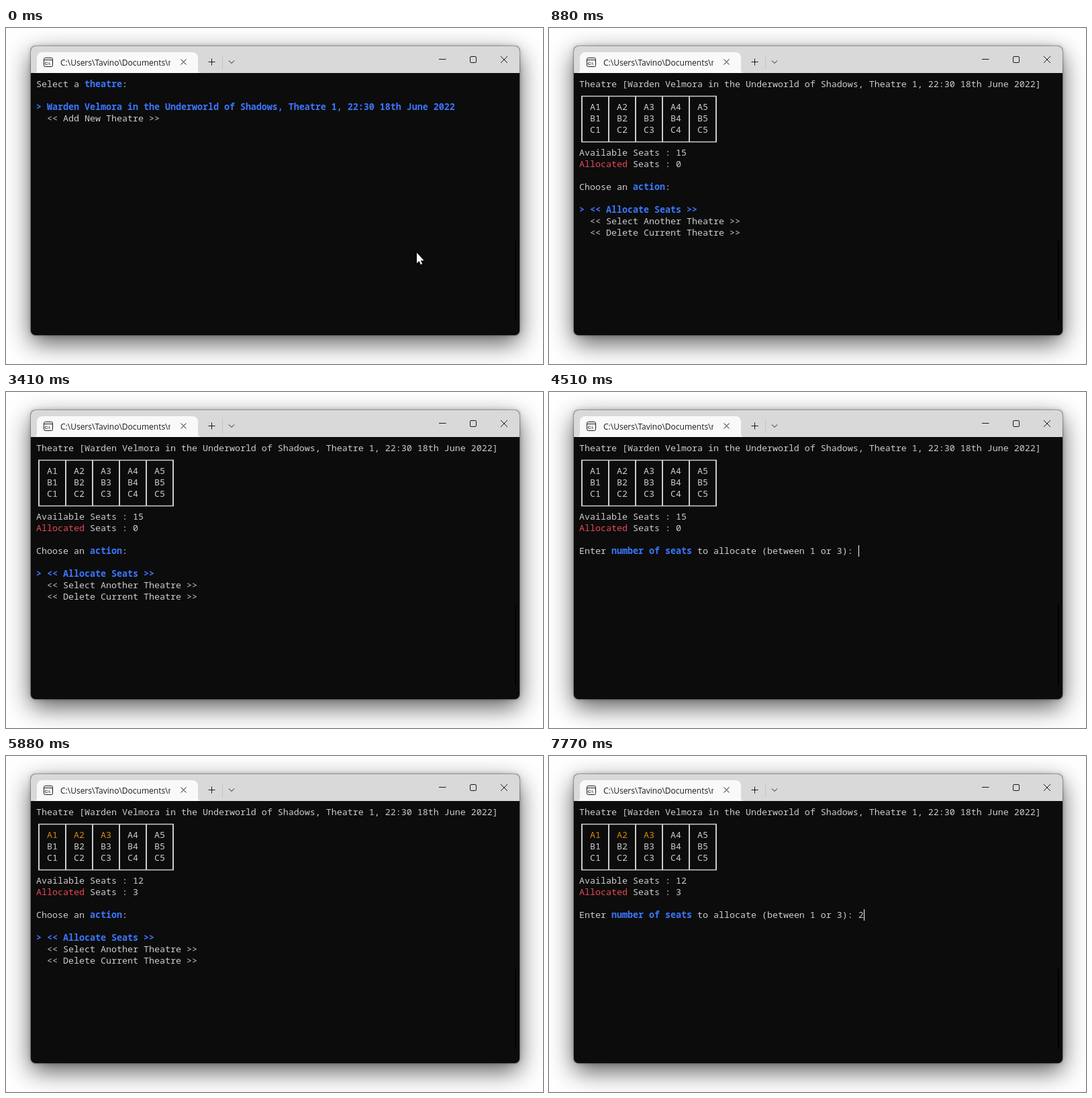
An HTML page that plays this animation: 800x500 px, repeating every 8000 ms.

```html
<!DOCTYPE html>
<html lang="en">
<head>
<meta charset="utf-8">
<title>Theatre seats</title>
<style>
  html, body { margin: 0; width: 100%; height: 100%; overflow: hidden; background: #fff; }
  .window {
    position: absolute; left: 37px; top: 27px; width: 728px; height: 430px;
    border-radius: 7px; background: #0c0c0c;
    box-shadow: 0 0 0 1px rgba(0,0,0,.25), 0 0 6px rgba(0,0,0,.25), 0 12px 36px rgba(0,0,0,.65);
  }
  svg { position: absolute; left: 0; top: 0; }
  .line { fill: none; stroke: #1a1a1a; stroke-width: 1; }
  .title { font: 500 12px "Open Sans", "Noto Sans", sans-serif; fill: #1a1a1a; }
  #screen text {
    font: 500 13.3333px "Noto Sans Mono", "Liberation Mono", monospace;
    fill: #ccc; white-space: pre;
  }
  #screen .blue { fill: #3b78ff; font-weight: 600; }
  #screen .red { fill: #e74856; }
  #screen .gold { fill: #d48a08; }
</style>
</head>
<body>
<div class="window"></div>
<svg width="800" height="500" viewBox="0 0 800 500">
  <clipPath id="tabClip"><rect x="81" y="40" width="164" height="24"/></clipPath>
  <path d="M37 67V34a7 7 0 0 1 7-7H758a7 7 0 0 1 7 7V67z" fill="#d9d9d9"/>
  <path d="M41 67q5 0 5-5V44a8 8 0 0 1 8-8H278a8 8 0 0 1 8 8V62q0 5 5 5z" fill="#f9f9f9"/>
  <rect class="line" x="56.5" y="44.5" width="13" height="13" rx="2"/>
  <path class="line" d="M56.5 47.5h13"/>
  <text x="57.7" y="55" font-family="Liberation Sans, sans-serif" font-size="6" font-weight="700" fill="#1a1a1a">C:\</text>
  <text class="title" x="81" y="56" clip-path="url(#tabClip)">C:\Users\Tavino\Documents\n</text>
  <path class="line" d="M260.5 46.5l8 8m0-8l-8 8M301.5 50.5h10m-5-5v10M332 48.5l4 4 4-4"/>
  <path d="M322.5 40v22" stroke="#c6c6c6"/>
  <path class="line" d="M645 46.5h10.5M737 42l10 10m0-10l-10 10"/>
  <rect class="line" x="691.5" y="42.5" width="9" height="9" rx="1.5"/>
  <path d="M759 317v119" stroke="#000" stroke-width="2"/>
  <g id="screen"></g>
  <path id="pointer" d="M612 334.5V350l3.5-3.3 2.4 5.4 2.2-1-2.4-5.2h4.9z" fill="#fff"/>
</svg>
<script>
const LOOP = 8000;
const show = "Warden Velmora in the Underworld of Shadows, Theatre 1, 22:30 18th June 2022";
const screen = document.getElementById("screen");
const pointer = document.getElementById("pointer");

const paint = (color, s) => `<tspan class="${color}">${s}</tspan>`;
const button = s => `&lt;&lt; ${s} &gt;&gt;`;
const text = (row, s, col = 0) => `<text x="${45 + 8 * col}" y="${88 + 17 * row}">${s}</text>`;

const menu = (row, items, chosen) => items.map((s, i) =>
  text(row + i, i === chosen ? paint("blue", "&gt; " + s) : "  " + s)).join("");

function theatreList(chosen) {
  return text(0, `Select a ${paint("blue", "theatre")}:`) +
    menu(2, [show, button("Add New Theatre")], chosen);
}

function seatPlan(taken) {
  let out = text(0, `Theatre [${show}]`);
  for (let i = 0; i < 6; i++)
    out += `<path d="M${49 + 40 * i} 101v69" stroke="#ccc" stroke-width="2"/>`;
  out += '<path d="M48 101.5h202M48 169.5h202" stroke="#ccc" stroke-width="1.3"/>';
  for (let i = 0; i < 15; i++) {
    const col = i % 5, row = Math.floor(i / 5);
    const seat = "ABC"[row] + (col + 1);
    out += text(2 + row, i < taken ? paint("gold", seat) : seat, 2 + 5 * col);
  }
  return out + text(6, `Available Seats : ${15 - taken}`) +
    text(7, `${paint("red", "Allocated")} Seats : ${taken}`);
}

function actions(taken, chosen) {
  return seatPlan(taken) + text(9, `Choose an ${paint("blue", "action")}:`) +
    menu(11, ["Allocate Seats", "Select Another Theatre", "Delete Current Theatre"].map(button), chosen);
}

function prompt(taken, typed, caret) {
  const x = 461 + 8 * typed.length;
  return seatPlan(taken) +
    text(9, `Enter ${paint("blue", "number of seats")} to allocate (between 1 or 3): ${typed}`) +
    (caret ? `<rect x="${x}" y="228" width="1" height="17" fill="#fff"/>` : "");
}

// [start in ms, view]
const steps = [
  [0, () => theatreList(0)],
  [70, () => theatreList(1)],
  [360, () => theatreList(0)],
  [880, () => actions(0, 0)],
  [2680, () => actions(0, 1)],
  [2910, () => actions(0, 2)],
  [3240, () => actions(0, 1)],
  [3410, () => actions(0, 0)],
  [4510, () => prompt(0, "", true)],
  [5090, () => prompt(0, "", false)],
  [5520, () => prompt(0, "3", true)],
  [5880, () => actions(3, 0)],
  [7070, () => prompt(3, "", true)],
  [7630, () => prompt(3, "", false)],
  [7700, () => prompt(3, "2", false)],
  [7770, () => prompt(3, "2", true)]
];

let current;
function frame() {
  const t = performance.now() % LOOP;
  const step = steps.findLast(s => s[0] <= t);
  if (step !== current) {
    current = step;
    screen.innerHTML = step[1]();
  }
  pointer.style.display = t < 850 ? "" : "none";
  requestAnimationFrame(frame);
}
frame();
</script>
</body>
</html>
```
